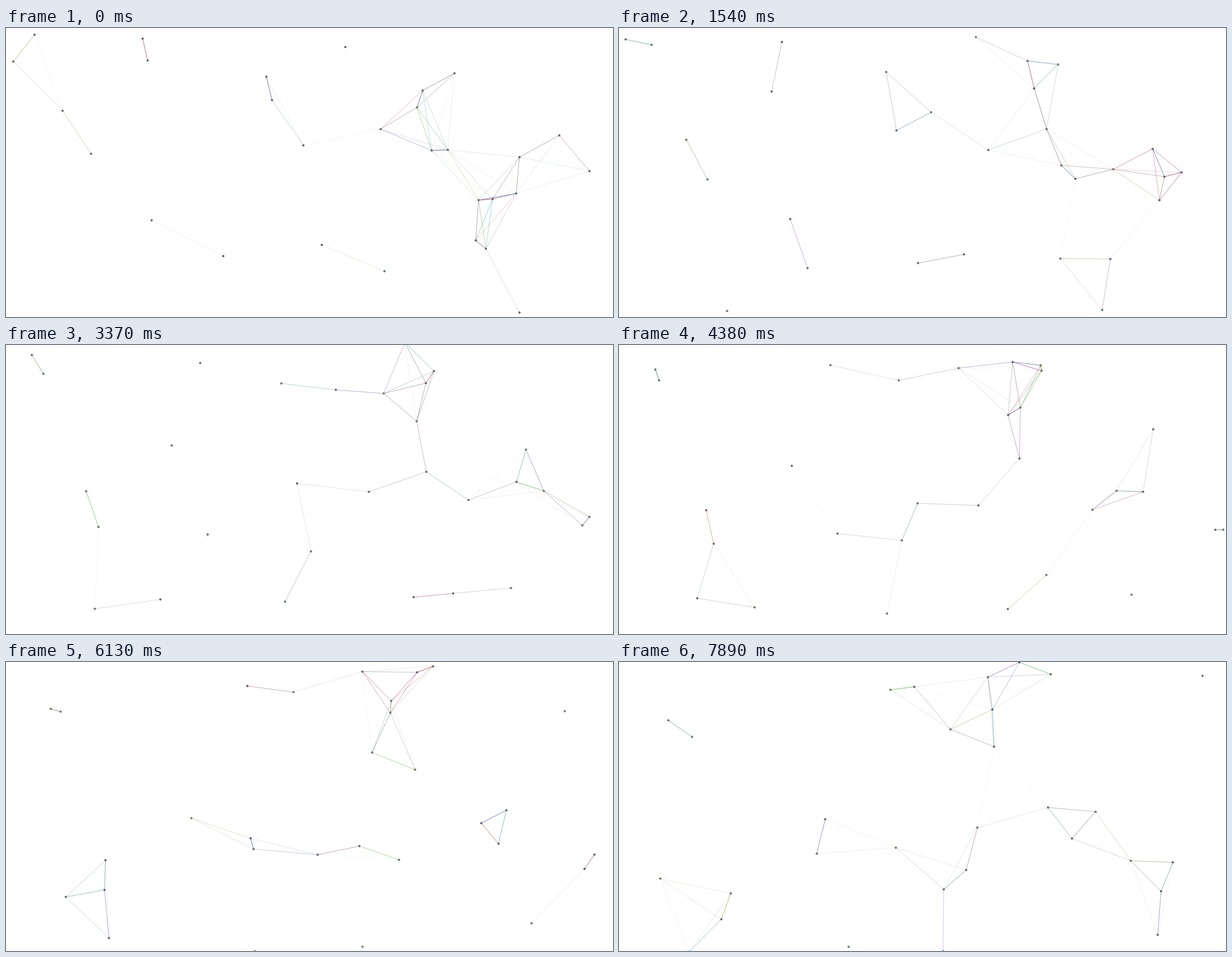
Animation, 1084 px wide and 517 px high, one loop 8000 ms. Source, as an HTML page with a canvas:

```html
<!DOCTYPE html>
<html lang="en">
<head>
<meta charset="utf-8">
<title>Drifting network</title>
<style>
  html, body { margin: 0; width: 100%; height: 100%; overflow: hidden; background: #fff; }
  canvas { display: block; }
</style>
</head>
<body>
<canvas id="stage" width="1084" height="517"></canvas>
<script>
const stage = document.getElementById('stage');
const ctx = stage.getContext('2d');
const LOOP = 8000;
const COLOR_STEP = 80; // ms between colour changes
const REACH = 155;     // longest distance that is linked
const DOT_RADIUS = 1.6;
const BOUNDS = { left: -2, right: 1088.5, top: -4.4, bottom: 532 };

// Starting state of each particle: x, y, then velocity in pixels per second.
// Everything else follows from straight motion and bouncing.
const particles = [
  [51, 12, 4.7, 11.7], [13, 60, -18.7, -25.7], [101, 148, 12.5, 33.7],
  [152, 225, 3.9, 29.8], [244, 19, 30.5, 3.9], [253, 58, 12.7, 36.1],
  [465, 87, 7.9, -5.4], [475, 129, 13.3, 35.2], [531, 210, 17.2, -38.5],
  [606, 34, 20.3, -38.4], [669, 181, -6.2, 24.2], [744, 112, -9.4, -34.5],
  [734, 142, 4.7, -21.9], [801, 81, -10.9, -10.2], [760, 219, 19.5, 17.3],
  [789, 218, -16.5, -24.2], [917, 231, 37, 22.7], [988, 192, -22.7, 15.7],
  [1042, 256, -24.2, 1.5], [911, 296, 35.1, 7.9], [869, 306, -35.1, -23.5],
  [844, 308, 25.1, -35.9], [839, 380, -33, 21.1], [857, 395, 13.3, 11.8],
  [917, 509, -35.1, 32.8], [260, 344, 29.7, -1.5], [388, 408, -33.3, 14],
  [564, 388, -19.5, 21.1], [676, 435, -39, -19.5], [222, 529, -18.8, 18.7]
];

function random(a, b, c) {
  const s = Math.sin(a * 12.9898 + b * 78.233 + c * 37.719) * 43758.5453;
  return s - Math.floor(s);
}

function randomColor(step, i, j) {
  const hue = 360 * random(step, i, j);
  const saturation = 60 * Math.sqrt(random(j, step, i));
  return `hsl(${hue}, ${saturation}%, 42%)`;
}

function bounce(v, low, high) {
  if (v < low) return 2 * low - v;
  return v > high ? 2 * high - v : v;
}

function positionAt([x, y, vx, vy], seconds) {
  return {
    x: bounce(x + vx * seconds, BOUNDS.left, BOUNDS.right),
    y: bounce(y + vy * seconds, BOUNDS.top, BOUNDS.bottom)
  };
}

function drawLink(p, q, color) {
  const distance = Math.hypot(p.x - q.x, p.y - q.y);
  if (distance >= REACH) return;
  ctx.globalAlpha = 1 - distance / REACH;
  ctx.strokeStyle = color;
  ctx.beginPath();
  ctx.moveTo(p.x, p.y);
  ctx.lineTo(q.x, q.y);
  ctx.stroke();
}

function drawDot(p, fill) {
  ctx.globalAlpha = 0.85;
  ctx.fillStyle = fill;
  ctx.strokeStyle = '#555';
  ctx.beginPath();
  ctx.arc(p.x, p.y, DOT_RADIUS, 0, 2 * Math.PI);
  ctx.fill();
  ctx.stroke();
}

function draw(time) {
  const step = Math.floor(time / COLOR_STEP);
  const points = particles.map(particle => positionAt(particle, time / 1000));

  ctx.clearRect(0, 0, stage.width, stage.height);
  ctx.lineWidth = 1;
  points.forEach((p, i) => {
    for (let j = i + 1; j < points.length; j++) {
      drawLink(p, points[j], randomColor(step, i, j));
    }
  });
  points.forEach((p, i) => drawDot(p, randomColor(step, i, i)));
}

function frame() {
  draw(performance.now() % LOOP);
  requestAnimationFrame(frame);
}
frame();
</script>
</body>
</html>
```
